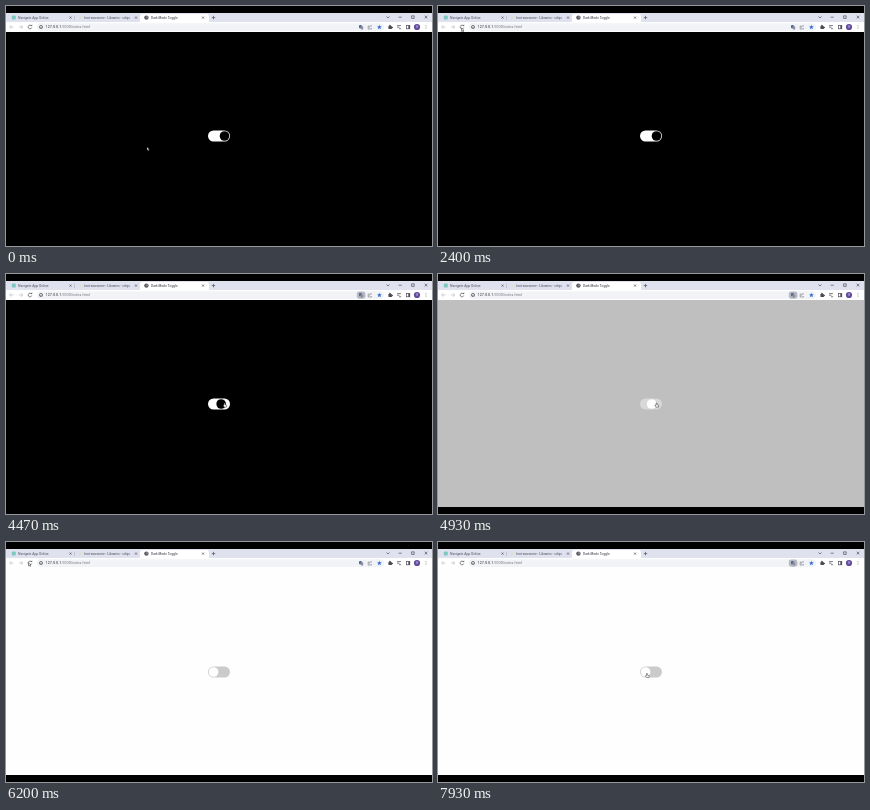
Write an HTML page with a canvas that moves like this. It is 426 by 240 pixels and loops after 8 s.

```html
<!DOCTYPE html>
<html lang="en">
<head>
<meta charset="utf-8">
<title>Dark Mode Toggle</title>
<style>
html, body { margin: 0; width: 100%; height: 100%; overflow: hidden; background: #000; }
canvas { display: block; width: 100%; height: 100%; }
</style>
</head>
<body>
<canvas id="stage"></canvas>
<script>
const W = 426, H = 240, LOOP = 8000;
const canvas = document.getElementById('stage');
const ctx = canvas.getContext('2d');
const ratio = window.devicePixelRatio || 1;
canvas.width = W * ratio;
canvas.height = H * ratio;

const FONT = 'Roboto, "Open Sans", sans-serif';
const INK = '#4c4d58';
const PALE = '#babac4';

// Moments of the story, in ms
const RELOAD_DARK = 2640, CLICK_ON = 4250, CLICK_OFF = 4700, FADE = 500;
const badgeTimes = [[2900, 5350], [6700, LOOP]];

// Pointer stops: time, x, y
const stops = [
  [0, 141, 141], [150, 141, 141], [1150, 22, 18], [1700, 22, 18],
  [2150, 23.5, 22], [2850, 23.5, 22], [3730, 188.5, 114], [4080, 218, 129],
  [5250, 218, 129], [6050, 22.5, 20.5], [6650, 22.5, 20.5],
  [7600, 208.5, 131.5], [LOOP, 208.5, 131.5]
];

const clamp = v => Math.min(1, Math.max(0, v));
const lerp = (a, b, p) => a + (b - a) * p;
const smooth = p => p * p * (3 - 2 * p);
const easeOut = p => 1 - Math.pow(1 - p, 2.25);
const gray = v => `rgb(${v},${v},${v})`;

function rect(x, y, w, h, color) {
  ctx.fillStyle = color;
  ctx.fillRect(x, y, w, h);
}

function round(x, y, w, h, r, color) {
  ctx.fillStyle = color;
  ctx.beginPath();
  ctx.roundRect(x, y, w, h, r);
  ctx.fill();
}

function disc(x, y, r, color) {
  ctx.fillStyle = color;
  ctx.beginPath();
  ctx.arc(x, y, r, 0, Math.PI * 2);
  ctx.fill();
}

function ring(x, y, r, color, from = 0, to = Math.PI * 2) {
  ctx.strokeStyle = color;
  ctx.lineWidth = 0.7;
  ctx.beginPath();
  ctx.arc(x, y, r, from, to);
  ctx.stroke();
}

function line(color, ...pts) {
  ctx.strokeStyle = color;
  ctx.lineWidth = 0.7;
  ctx.beginPath();
  for (let i = 0; i < pts.length; i += 2) ctx.lineTo(pts[i], pts[i + 1]);
  ctx.stroke();
}

function shape(x, y, pts, color) {
  ctx.beginPath();
  for (let i = 0; i < pts.length; i += 2) ctx.lineTo(x + pts[i], y + pts[i + 1]);
  ctx.closePath();
  ctx.fillStyle = color;
  ctx.fill();
}

function text(str, x, y, size, color) {
  ctx.font = `${size}px ${FONT}`;
  ctx.textBaseline = 'middle';
  ctx.fillStyle = color;
  ctx.fillText(str, x, y);
  return x + ctx.measureText(str).width;
}

function cross(x, y, r, color) {
  line(color, x - r, y - r, x + r, y + r);
  line(color, x + r, y - r, x - r, y + r);
}

function star(x, y, r, color) {
  const pts = [];
  for (let i = 0; i < 10; i++) {
    const a = -Math.PI / 2 + i * Math.PI / 5, d = i % 2 ? r * 0.45 : r;
    pts.push(d * Math.cos(a), d * Math.sin(a));
  }
  shape(x, y, pts, color);
}

function drawTabs() {
  rect(0, 7, W, 9, '#dfe1ef');
  round(134, 8, 69, 9, [2.5, 2.5, 0, 0], '#fff');
  round(5.8, 9.6, 4, 4, 1, '#7dc8bd');
  disc(74, 11.6, 1.7, '#e3dfca');
  disc(140.4, 11.6, 2.2, '#5c5c66');
  disc(141, 11.1, 0.7, '#c9c9d2');
  text('Navigate App Online', 12, 11.8, 3.4, '#4d4e59');
  text('font-awesome - Libraries - cdnjs', 78, 11.8, 3.25, '#4d4e59');
  text('Dark Mode Toggle', 145, 11.8, 3.3, '#33343c');
  for (const x of [64.5, 130, 197]) cross(x, 11.6, 1, INK);
  line('#b5b5c8', 68.5, 9.5, 68.5, 14);
  line(INK, 205.8, 11.6, 209.2, 11.6);
  line(INK, 207.5, 9.9, 207.5, 13.3);

  line(INK, 380.5, 10.5, 382, 12, 383.5, 10.5);
  line(INK, 392.7, 11.2, 395.7, 11.2);
  ctx.strokeStyle = INK;
  ctx.strokeRect(405.7, 9.9, 2.4, 2.4);
  cross(420, 11.1, 1.3, INK);
}

function drawToolbar(badge) {
  rect(0, 16, W, 10, '#fff');
  round(31, 17.3, 347, 7.6, 3.8, '#f2f3f6');
  line(PALE, 7.5, 21, 3.7, 21, 5.4, 19.3);
  line(PALE, 3.7, 21, 5.4, 22.7);
  line(PALE, 13, 21, 16.8, 21, 15.1, 19.3);
  line(PALE, 16.8, 21, 15.1, 22.7);
  ring(24, 21, 1.8, INK, 0.3, 5.5);
  shape(24.4, 18.5, [0, 1.6, 1.8, 1.6, 1.8, 0], INK);

  ring(35, 21, 1.6, INK);
  line(INK, 35, 20.7, 35, 22);
  const end = text('127.0.0.1', 39.5, 21.2, 3.8, '#33343c');
  text(':5500/index.html', end, 21.2, 3.8, '#777782');

  if (badge) round(350.8, 17.5, 8.6, 7.2, 2.4, '#b9b9c2');
  round(353, 19, 2.7, 3.3, 0.4, '#5a6894');
  round(354.7, 20.2, 2.5, 3.2, 0.4, '#8b90a2');
  line('#85858f', 363.2, 20, 362.2, 20, 362.2, 23, 365.4, 23, 365.4, 22);
  line('#85858f', 363.4, 21.6, 364, 20, 366, 19.8);
  star(373.4, 21.2, 2.5, '#3d6fd2');

  round(382.4, 20, 3.6, 3, 0.4, INK);
  disc(384, 19.7, 0.9, INK);
  disc(386.2, 21.5, 0.8, INK);
  line(INK, 391, 19.6, 395, 19.6);
  line(INK, 391, 21.2, 393.5, 21.2);
  line(INK, 393, 22.7, 395.2, 22.7);
  ctx.strokeStyle = INK;
  ctx.strokeRect(400.4, 19.4, 3.4, 3.4);
  rect(402.3, 19.4, 1.6, 3.4, INK);
  disc(411, 21, 3.1, '#634b9d');
  text('H', 409.9, 21.2, 3.2, '#e3daf5');
  for (const y of [19.4, 21, 22.6]) disc(420, y, 0.45, INK);
}

function drawPage(t) {
  const light = easeOut(clamp((t - CLICK_OFF) / FADE));
  rect(0, 26, W, 207, gray(Math.round(254 * light)));

  let side = t < RELOAD_DARK ? 1 : smooth(clamp((t - CLICK_ON) / 350));
  if (t >= CLICK_OFF) side = 1 - smooth(clamp((t - CLICK_OFF) / FADE));

  round(202, 124.5, 22, 11, 5.5, gray(Math.round(lerp(255, 203, light))));
  disc(lerp(207.6, 218.5, side), 130, 4.8, t < CLICK_OFF + 60 ? '#000' : '#fff');
}

function pointerAt(t) {
  const i = Math.max(1, stops.findIndex(s => s[0] > t));
  const [t0, x0, y0] = stops[i - 1], [t1, x1, y1] = stops[i];
  const p = smooth(clamp((t - t0) / (t1 - t0)));
  return [lerp(x0, x1, p), lerp(y0, y1, p)];
}

function drawPointer(t) {
  const [x, y] = pointerAt(t);
  const overToggle = x > 202 && x < 224 && y > 124 && y < 136;
  const pts = overToggle
    ? [0, 0, 0.9, 0, 0.9, 1.6, 2.7, 2.1, 2.5, 4.1, 0.2, 4.1, -1.2, 2.3, 0, 2.4]
    : [0, 0, 0, 3.4, 0.8, 2.7, 1.4, 4, 2, 3.7, 1.4, 2.4, 2.5, 2.4];
  shape(x, y, pts, '#fff');
  ctx.strokeStyle = '#222';
  ctx.lineWidth = 0.45;
  ctx.stroke();
}

function draw(now) {
  const t = now % LOOP;
  ctx.setTransform(ratio, 0, 0, ratio, 0, 0);
  rect(0, 0, W, H, '#000');
  drawPage(t);
  drawTabs();
  drawToolbar(badgeTimes.some(([a, b]) => t >= a && t < b));
  drawPointer(t);
  requestAnimationFrame(draw);
}
requestAnimationFrame(draw);
</script>
</body>
</html>
```
